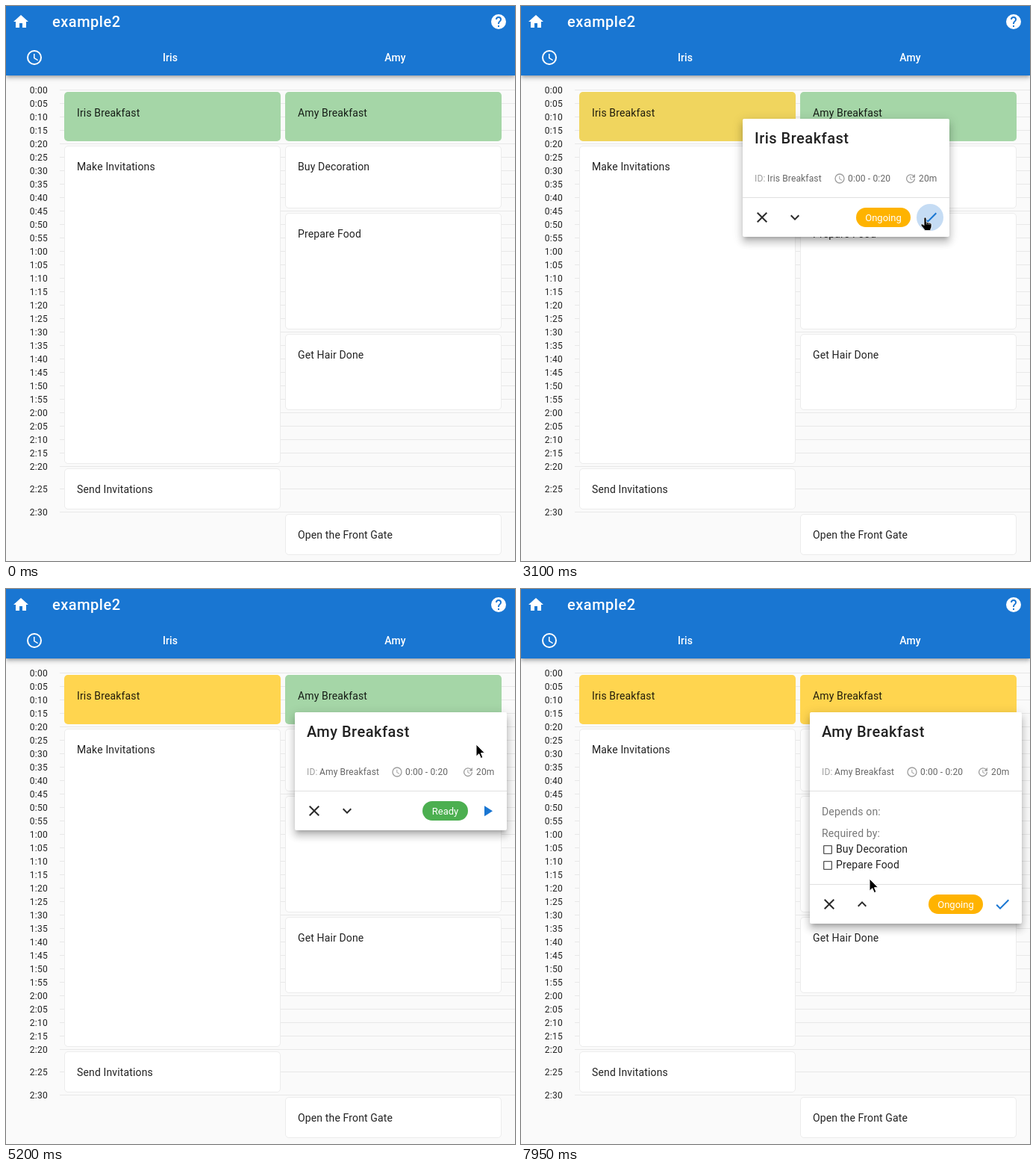
Write an HTML page that moves like this. It is 682x743 px and loops after 8000 ms.

```html
<!DOCTYPE html>
<html lang="en">
<head>
<meta charset="utf-8">
<title>example2</title>
<style>
html, body { margin: 0; width: 100%; height: 100%; overflow: hidden; }
body { background: #fafafa; font: 14px Roboto, sans-serif; color: rgba(0,0,0,.87); }
#stage { position: relative; width: 682px; height: 743px; overflow: hidden; background: #fafafa; }
#stage div, #stage svg { position: absolute; }
.text { line-height: 20px; white-space: pre; letter-spacing: .14px; }
.title { font-size: 20px; font-weight: 500; letter-spacing: .5px; }
.small { font-size: 12px; letter-spacing: .15px; color: #666; }
.time { font-size: 12px; letter-spacing: .3px; }
.head { color: #fff; font-weight: 500; }
.mid { width: 100px; text-align: center; }
.dim { color: #9e9e9e; }
.grey { color: #777; }
.bar { left: 0; top: 0; width: 682px; height: 93px; background: #1976d2;
  box-shadow: 0 2px 4px -1px rgba(0,0,0,.2), 0 4px 5px rgba(0,0,0,.14), 0 1px 10px rgba(0,0,0,.12); }
.line { left: 72px; width: 610px; height: 1px; background: #e8e8e8; }
.card { width: 290px; box-sizing: border-box; border: 1px solid #ececec; border-radius: 5px; background: #fff; }
.menu { background: #fff; border-radius: 2px;
  box-shadow: 0 5px 5px -3px rgba(0,0,0,.2), 0 8px 10px 1px rgba(0,0,0,.14), 0 3px 14px 2px rgba(0,0,0,.12); }
.rule { left: 0; width: 100%; height: 1px; background: #e0e0e0; }
.halo { width: 36px; height: 36px; border-radius: 50%; }
.chip { right: 52px; height: 26px; border-radius: 13px; color: #fff; font-size: 13px; line-height: 27px; text-align: center; }
#cursor { left: 0; top: 0; overflow: visible; }
</style>
</head>
<body>
<div id="stage"></div>
<script>
const LOOP = 8000, STEP = 50;
const GREEN = [165, 214, 167], YELLOW = [255, 213, 79];
const READY = [76, 175, 80], ONGOING = [255, 179, 0];
const people = ['Iris', 'Amy'];

const icons = {
  home: 'M10 20V14H14V20H19V12H22L12 3L2 12H5V20H10Z',
  help: 'M15.07 11.25L14.17 12.17C13.45 12.89 13 13.5 13 15H11V14.5C11 13.39 11.45 12.39 12.17 11.67L13.41 10.41C13.78 10.05 14 9.55 14 9C14 7.89 13.1 7 12 7A2 2 0 0 0 10 9H8A4 4 0 0 1 16 9C16 9.88 15.64 10.67 15.07 11.25M13 19H11V17H13M12 2A10 10 0 0 0 12 22A10 10 0 0 0 12 2Z',
  clock: 'M12 20A8 8 0 0 0 12 4A8 8 0 0 0 12 20M12 2A10 10 0 0 1 12 22A10 10 0 0 1 12 2M12.5 7V12.25L17 14.92L16.25 16.15L11 13V7H12.5Z',
  update: 'M21 10.12H14.22L16.96 7.3A7 7 0 1 0 19 12.1H21A9 9 0 1 1 18.27 5.81L21 3V10.12M12.5 8V12.25L16 14.33L15.28 15.54L11 13V8H12.5Z',
  close: 'M19 6.41L17.59 5L12 10.59L6.41 5L5 6.41L10.59 12L5 17.59L6.41 19L12 13.41L17.59 19L19 17.59L13.41 12Z',
  down: 'M7.41 8.58L12 13.17L16.59 8.58L18 10L12 16L6 10Z',
  up: 'M7.41 15.41L12 10.83L16.59 15.41L18 14L12 8L6 14Z',
  play: 'M8 5.14V19.14L19 12.14Z',
  check: 'M21 7L9 19L3.5 13.5L4.91 12.09L9 16.17L19.59 5.59Z',
  box: 'M19 3H5C3.89 3 3 3.89 3 5V19A2 2 0 0 0 5 21H19A2 2 0 0 0 21 19V5C21 3.89 20.1 3 19 3M19 5V19H5V5H19Z'
};
const arrowSvg = '<path d="M0 0V16.2L3.8 12.7L6.3 18.6L8.9 17.5L6.5 11.7H11.5Z" fill="#000" stroke="#fff" stroke-width="1"/>';
const handSvg = '<path d="M-2 1.8Q-2 0 -.5 0T1 1.8V6.2L6.4 7.4Q8 7.8 8 9.6V12Q8 14.5 6.8 15.4V17.5H-1.5V16.2L-5.7 11.2Q-6.6 9.4 -5.2 8.9Q-4 8.6 -3 9.6L-2 10.6Z" fill="#000" stroke="#fff" stroke-width=".8"/>' +
  '<path d="M1.3 7V9.5M3.6 7.4V9.7M5.8 8V10" stroke="#fff" stroke-width=".7"/>';

function add(parent, cls, css = '', html = '') {
  const el = document.createElement('div');
  el.className = cls;
  el.style.cssText = css;
  el.innerHTML = html;
  parent.append(el);
  return el;
}

// y is the vertical middle of the line
const text = (parent, str, x, y, cls = '') =>
  add(parent, 'text ' + cls, `left:${x}px;top:${y - 10}px`, str);

// x and y are the middle of the icon
function icon(parent, name, x, y, size, color, side = 'left') {
  const half = size / 2;
  return add(parent, '', `${side}:${x - half}px;top:${y - half}px;width:${size}px;height:${size}px`,
    `<svg width="${size}" height="${size}" viewBox="0 0 24 24"><path fill="${color}" d="${icons[name]}"/></svg>`);
}

const stage = document.getElementById('stage');
for (let i = 0; i <= 30; i++) {
  const y = i === 30 ? 677 : i === 29 ? 646 : 112 + 18 * i;
  const min = 5 * i;
  add(stage, 'line', `top:${y}px`);
  text(stage, `${Math.floor(min / 60)}:${String(min % 60).padStart(2, '0')}`, 31.8, y + 1, 'time');
}

function card(col, top, bottom, label) {
  const left = col ? 374 : 78;
  const el = add(stage, 'card', `left:${left}px;top:${top}px;height:${bottom - top}px`);
  text(stage, label, left + 17, top + 28);
  return el;
}
const meals = people.map((name, col) => card(col, 115, 181, name + ' Breakfast'));
meals.forEach(el => el.style.border = 0);
card(0, 187, 613, 'Make Invitations');
card(0, 619, 674, 'Send Invitations');
card(1, 187, 271, 'Buy Decoration');
card(1, 277, 433, 'Prepare Food');
card(1, 439, 541, 'Get Hair Done');
card(1, 680, 735, 'Open the Front Gate');

const bar = add(stage, 'bar');
icon(bar, 'home', 20, 21, 24, '#fff');
icon(bar, 'help', 660, 21, 24, '#fff');
icon(bar, 'clock', 38, 69, 24, '#fff');
text(bar, 'example2', 62, 21, 'title head');
text(bar, people[0], 170, 69, 'head mid');
text(bar, people[1], 471.5, 69, 'head mid');

function makeMenu(name, width) {
  const el = add(stage, 'menu', `width:${width}px`);
  text(el, name + ' Breakfast', 16, 26, 'title');
  text(el, 'ID:', 16, 80, 'small dim');
  text(el, name + ' Breakfast', 33, 80, 'small');
  icon(el, 'clock', width - 147, 80, 16, '#9e9e9e');
  text(el, '0:00 - 0:20', width - 136, 80, 'small');
  icon(el, 'update', width - 52, 80, 16, '#9e9e9e');
  text(el, '20m', width - 41, 80, 'small');
  add(el, 'rule', 'top:105px');

  const more = add(el, '', `left:0;top:0;width:${width}px`);
  text(more, 'Depends on:', 16, 133, 'grey');
  text(more, 'Required by:', 16, 162, 'grey');
  ['Buy Decoration', 'Prepare Food'].forEach((label, i) => {
    icon(more, 'box', 24, 184 + 21 * i, 16, '#555');
    text(more, label, 35, 183 + 21 * i);
  });
  add(more, 'rule', 'top:230px');

  const foot = add(el, '', `left:0;width:${width}px;height:53px`);
  const foldHalo = add(foot, 'halo', 'left:52px;top:9px;background:#000');
  const goHalo = add(foot, 'halo', 'right:8px;top:9px;background:#1976d2');
  icon(foot, 'close', 26, 27, 24, '#2b2b2b');
  const down = icon(foot, 'down', 70, 27, 24, '#2b2b2b');
  const up = icon(foot, 'up', 70, 27, 24, '#2b2b2b');
  const play = icon(foot, 'play', 26, 27, 24, '#1976d2', 'right');
  const check = icon(foot, 'check', 26, 27, 24, '#1976d2', 'right');
  const chip = add(foot, 'chip', 'top:14px');
  return { el, more, foot, foldHalo, goHalo, down, up, play, check, chip };
}
const menus = [makeMenu(people[0], 277), makeMenu(people[1], 284)];

stage.insertAdjacentHTML('beforeend', '<svg id="cursor" width="1" height="1"><g></g><g></g></svg>');
const cursor = document.getElementById('cursor');
const [arrow, hand] = cursor.children;
arrow.innerHTML = arrowSvg;
hand.innerHTML = handSvg;

// time, x, y of the pointer tip
const path = [
  [500, 615, 142], [600, 490, 130], [700, 365, 124], [800, 287, 126], [850, 276, 134], [950, 297, 150],
  [1900, 297, 150], [2050, 350, 182], [2200, 480, 262], [2350, 546, 291], [2400, 546, 291], [2550, 542, 283],
  [3300, 542, 283], [3500, 556, 317], [3900, 556, 317], [3950, 562, 302], [4050, 562, 302],
  [4250, 628, 163], [4350, 622, 165], [5100, 622, 165], [5400, 645, 295], [5450, 644, 304],
  [6200, 644, 304], [6300, 590, 317], [6450, 468, 304], [6500, 455, 303], [6600, 455, 303], [6650, 456, 300],
  [7350, 456, 300], [7650, 472, 363], [7750, 472, 364], [7950, 467, 388]
];
const fades = [[4550, 1], [4600, .92], [4650, .85], [4700, .93], [4750, .97], [4800, 1]];
const halos = [
  [[2300, 0], [2450, .08], [2850, .08], [2900, .25], [3350, .25], [3450, 0]],
  [[5350, 0], [5450, .08], [5750, .08], [5800, .25], [6200, .25], [6350, 0]]
];
const foldFade = [[6600, 0], [6650, .08], [6800, .08], [6850, .2], [6950, .2], [7000, .1], [7100, .1], [7150, 0]];

const clamp = v => v < 0 ? 0 : v > 1 ? 1 : v;
const mix = (a, b, p) => a + (b - a) * p;
const rgb = (a, b, p) => `rgb(${a.map((v, i) => Math.round(mix(v, b[i], p)))})`;
const within = (t, a, b) => t >= a && t < b;
const show = (el, on) => el.style.display = on ? '' : 'none';

function track(keys, t, k = 1) {
  if (t <= keys[0][0]) return keys[0][k];
  const i = keys.findIndex(key => key[0] > t);
  if (i < 0) return keys[keys.length - 1][k];
  const a = keys[i - 1], b = keys[i];
  return mix(a[k], b[k], (t - a[0]) / (b[0] - a[0]));
}

const bezier = (x1, y1, x2, y2) => x => {
  x = clamp(x);
  if (x === 0 || x === 1) return x;
  const at = (s, a, b) => 3 * s * (1 - s) ** 2 * a + 3 * s * s * (1 - s) * b + s ** 3;
  let lo = 0, hi = 1;
  for (let i = 0; i < 24; i++) {
    const s = (lo + hi) / 2;
    if (at(s, x1, x2) < x) lo = s; else hi = s;
  }
  return at(hi, y1, y2);
};
const swing = bezier(.25, .8, .5, 1);
const ease = bezier(.25, .1, .25, 1);
const clicks = [2862, 5774];

function render(t) {
  meals.forEach((el, i) => el.style.background = rgb(GREEN, YELLOW, ease((t - clicks[i]) / 450)));

  const open = within(t, 1600, 4650) ? 0 : t >= 4650 ? 1 : -1;
  menus.forEach((m, i) => {
    show(m.el, i === open);
    if (i !== open) return;
    const move = swing((t - 4629) / 300);
    const wide = t >= 6850, busy = t >= clicks[i];
    const height = wide ? 283 : 158;
    m.el.style.left = Math.round(mix(297, 387, move)) + 'px';
    m.el.style.top = Math.round(mix(151, 165, move)) + 'px';
    m.el.style.height = height + 'px';
    m.el.style.opacity = t < 2000 ? swing((t - 1532) / 300) : track(fades, t);
    m.foot.style.top = height - 53 + 'px';
    show(m.more, wide);
    show(m.up, wide);
    show(m.down, !wide);
    show(m.check, busy);
    show(m.play, !busy);
    m.chip.textContent = busy ? 'Ongoing' : 'Ready';
    m.chip.style.width = (busy ? 73 : 61) + 'px';
    m.chip.style.background = rgb(READY, ONGOING, swing((t - clicks[i]) / 270));
    m.goHalo.style.opacity = track(halos[i], t);
    m.foldHalo.style.opacity = track(foldFade, t);
  });

  const pointing = within(t, 2350, 3400) || within(t, 5400, 6250) || within(t, 6650, 7400);
  show(cursor, t >= 500);
  show(hand, pointing);
  show(arrow, !pointing);
  cursor.style.transform = `translate(${Math.round(track(path, t, 1))}px,${Math.round(track(path, t, 2))}px)`;
}

const start = performance.now();
let last = -1;
function tick() {
  const t = Math.floor((performance.now() - start) % LOOP / STEP) * STEP;
  if (t !== last) render(last = t);
  requestAnimationFrame(tick);
}
tick();
</script>
</body>
</html>
```
